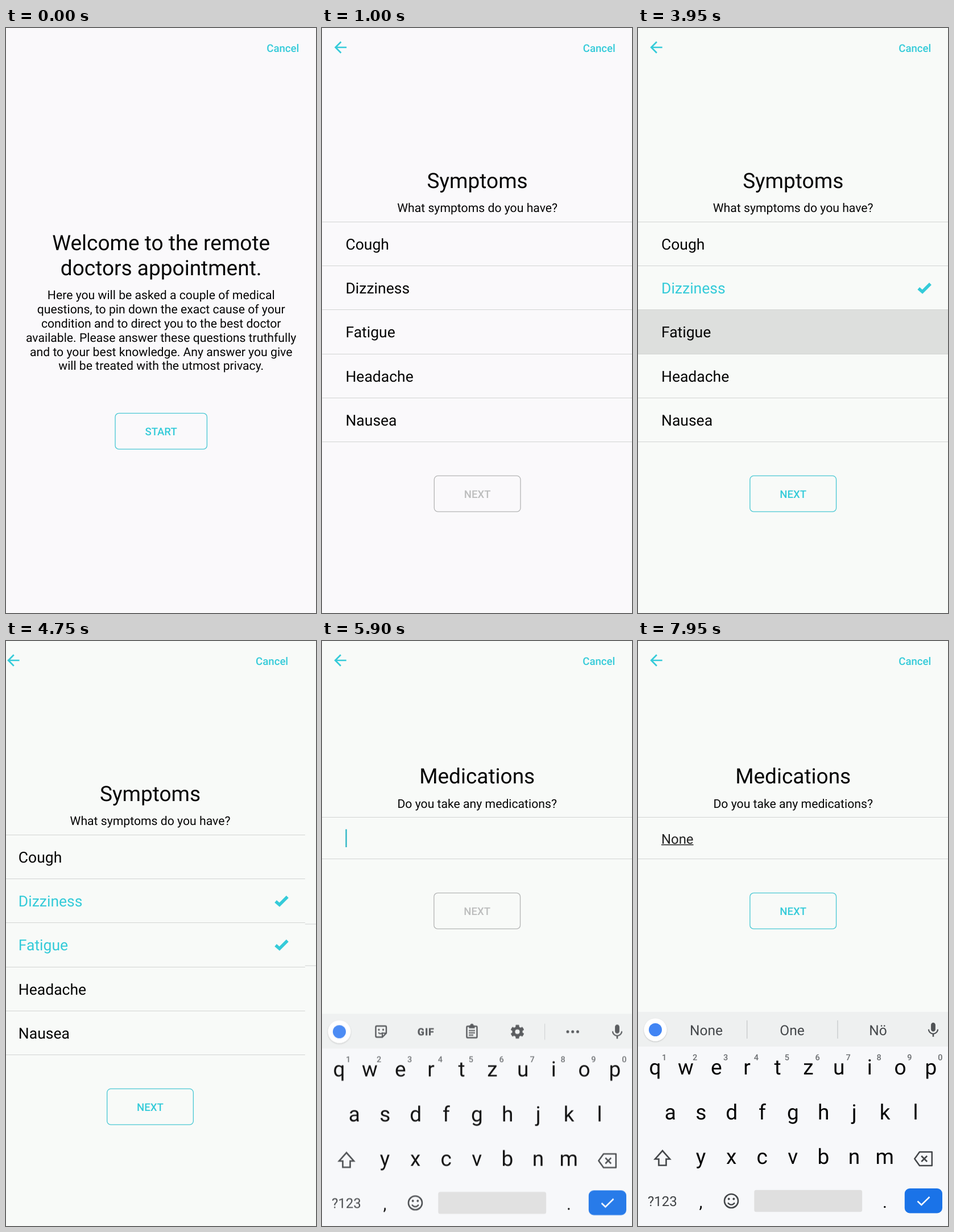
An HTML page for the animation above (8 s loop, 545 px wide and 1027 px high).

```html
<!DOCTYPE html>
<html lang="en">
<head>
<meta charset="utf-8">
<title>Remote appointment</title>
<style>
  html, body { margin: 0; width: 100%; height: 100%; overflow: hidden; background: #f9f9fa; }
  svg { display: block; width: 100%; height: 100%; }
  text { font-family: Roboto, "Noto Sans", sans-serif; fill: #050505; white-space: pre; text-rendering: geometricPrecision; }
  .mid { text-anchor: middle; }
  .title { font-size: 37px; }
  .body { font-size: 21.2px; }
  .item { font-size: 26.5px; }
  .action { font-size: 18.6px; font-weight: 500; }
  .entry { font-size: 23.9px; fill: #222; }
  .key { font-size: 37px; }
  .digit { font-size: 14.5px; font-weight: 500; fill: #6a6d70; }
  .sym { font-size: 24px; fill: #3f4245; }
  .word { font-size: 24.5px; fill: #45484b; }
  .line { fill: #d2d4d3; }
</style>
</head>
<body>
<svg id="stage" viewBox="0 0 545 1027" xmlns="http://www.w3.org/2000/svg"></svg>
<script>
const LOOP = 8000, STEP = 50, W = 545, MID = 272.7;
const TEAL = '#35cbd9', EDGE = '#4bc8d4', GREY = '#b5b6b6', ICON = '#505356', INK = '#434649';
const stage = document.getElementById('stage');

function add(parent, tag, attrs = {}, content) {
  const node = document.createElementNS('http://www.w3.org/2000/svg', tag);
  set(node, attrs);
  if (content !== undefined) node.textContent = content;
  parent.appendChild(node);
  return node;
}
function set(node, attrs) {
  for (const k in attrs) node.setAttribute(k, attrs[k]);
}
const show = (node, on) => set(node, { visibility: on ? 'visible' : 'hidden' });
const group = (parent, attrs) => add(parent, 'g', attrs);
const label = (parent, x, y, cls, content) => add(parent, 'text', { x, y, class: cls }, content);
const rect = (parent, x, y, width, height, attrs) => add(parent, 'rect', { x, y, width, height, ...attrs });
const stroke = (parent, d, color, width, attrs) =>
  add(parent, 'path', { d, fill: 'none', stroke: color, 'stroke-width': width, ...attrs });
const dot = (parent, cx, cy, r, fill) => add(parent, 'circle', { cx, cy, r, fill });

function header(page, back) {
  set(label(page, 486.8, 41.5, 'action mid', 'Cancel'), { style: `fill:${TEAL}` });
  if (back) add(page, 'path', {
    d: 'M20 11H7.83l5.59-5.59L12 4l-8 8 8 8 1.41-1.41L7.83 13H20z',
    transform: 'translate(16 18) scale(1.335)', fill: TEAL
  });
}

function button(parent, y, width, name) {
  const box = rect(parent, MID - width / 2, y, width, 63, { rx: 6.5, fill: 'none', 'stroke-width': 1.33 });
  const text = label(parent, MID, y + 38.5, 'action mid', name);
  return on => {
    set(box, { stroke: on ? EDGE : GREY });
    text.style.fill = on ? TEAL : '#bcbdbd';
  };
}

const defs = add(stage, 'defs');
function shadow(id, dy, blur, opacity) {
  const f = add(defs, 'filter', { id, x: '-40%', y: '-40%', width: '180%', height: '180%' });
  add(f, 'feDropShadow', { dx: 0, dy, stdDeviation: blur, 'flood-color': '#000', 'flood-opacity': opacity });
}
shadow('soft', 1, 1.3, 0.22);
shadow('lift', 2, 2.5, 0.3);

const backdrop = rect(stage, 0, 0, W, 1027);

// Welcome page
const welcome = group(stage);
header(welcome, false);
['Welcome to the remote', 'doctors appointment.'].forEach((s, i) =>
  label(welcome, MID, 390 + 43.5 * i, 'title mid', s));
['Here you will be asked a couple of medical',
 'questions, to pin down the exact cause of your',
 'condition and to direct you to the best doctor',
 'available. Please answer these questions truthfully',
 'and to your best knowledge. Any answer you give',
 'will be treated with the utmost privacy.'].forEach((s, i) =>
  label(welcome, MID, 476.3 + 24.8 * i, 'body mid', s));
button(welcome, 676.4, 161.4, 'START')(true);

// Symptoms page
const symptoms = group(stage);
header(symptoms, true);
label(symptoms, MID, 280.5, 'title mid', 'Symptoms');
label(symptoms, MID, 323.4, 'body mid', 'What symptoms do you have?');
const lineY = i => Math.round(340 + 77.2 * i);
const pressAt = { Dizziness: 2750, Fatigue: 3950 };
const rows = ['Cough', 'Dizziness', 'Fatigue', 'Headache', 'Nausea'].map((name, i) => {
  const y = lineY(i);
  const glow = rect(symptoms, 0, y, W, lineY(i + 1) - y, { fill: '#000' });
  const text = label(symptoms, 41, y + 49.2, 'item', name);
  const tick = stroke(symptoms, `M493.2 ${y + 40.1}L500 ${y + 46}L514 ${y + 32}`, TEAL, 5.5);
  return { glow, text, tick, press: pressAt[name] ?? Infinity };
});
for (let i = 0; i < 6; i++) rect(symptoms, 0, lineY(i), W, 1, { class: 'line' });
const nextSymptom = button(symptoms, 786.2, 151.7, 'NEXT');

// Medications page
const meds = group(stage);
header(meds, true);
const form = group(meds);
label(form, MID, 250, 'title mid', 'Medications');
label(form, MID, 292.8, 'body mid', 'Do you take any medications?');
rect(form, 0, 309, W, 1, { class: 'line' });
rect(form, 0, 382, W, 1, { class: 'line' });
const entry = label(form, 41, 355.7, 'entry', '');
const underline = rect(form, 41, 357, 0, 1.5, { fill: '#222' });
const caret = rect(form, 41, 330.5, 2.4, 31.5, { fill: '#2fb7c6' });
const nextMed = button(form, 442.4, 151.7, 'NEXT');

// Keyboard
const keyboard = group(stage);
rect(keyboard, 0, 651, W, 440, { fill: '#f7f8fa' });
rect(keyboard, 0, 651, W, 61, { fill: '#eef0f0' });
set(dot(keyboard, 30.5, 682.5, 20, '#fff'), { filter: 'url(#soft)' });
dot(keyboard, 30.5, 682.5, 11.5, '#4285f4');
add(keyboard, 'path', {
  d: 'M12 14c1.66 0 3-1.34 3-3V5c0-1.66-1.34-3-3-3S9 3.34 9 5v6c0 1.66 1.34 3 3 3z' +
     'M17.3 11c0 3-2.54 5.1-5.3 5.1S6.7 14.1 6.7 11H5c0 3.41 2.72 6.23 6 6.72V21h2v-3.28c3.28-.48 6-3.3 6-6.72z',
  transform: 'translate(503.4 667.5) scale(1.3)', fill: ICON
});

const tools = group(keyboard);
stroke(tools, 'M96.5 672.5H111a2 2 0 0 1 2 2V685L106 692H96.5a2 2 0 0 1-2-2V674.5a2 2 0 0 1 2-2z', ICON, 2.4);
stroke(tools, 'M106 692V687a2 2 0 0 1 2-2H113', ICON, 2);
stroke(tools, 'M99 684q4 4 8 0', ICON, 2);
dot(tools, 100, 679, 1.7, ICON);
dot(tools, 107.5, 679, 1.7, ICON);
set(label(tools, 182.8, 688.6, 'mid', 'GIF'),
  { style: `fill:${ICON};font-size:18px;font-weight:900;letter-spacing:.8px` });
rect(tools, 254.5, 673, 18, 20, { rx: 1.5, fill: 'none', stroke: ICON, 'stroke-width': 2.4 });
rect(tools, 258.5, 671.5, 10, 5, { fill: ICON });
dot(tools, 263.5, 671.5, 3, ICON);
stroke(tools, 'M258 680.5H269M258 684.5H269M258 688.5H266', ICON, 2);
add(tools, 'circle', { cx: 343.5, cy: 682.5, r: 6.6, fill: 'none', stroke: ICON, 'stroke-width': 5 });
for (let a = 0; a < 360; a += 60)
  rect(tools, 340.4, 670.6, 6.2, 5, { rx: 1, fill: ICON, transform: `rotate(${a} 343.5 682.5)` });
rect(tools, 391, 668.5, 1.2, 28, { fill: '#d0d3d4' });
for (const x of [432, 440.7, 449.5]) dot(tools, x, 682.5, 2.5, ICON);

const hints = group(keyboard);
for (const x of [191, 350.3]) rect(hints, x, 666, 1.3, 32, { fill: '#c6c9ca' });
const words = [120, 271, 422].map(x => label(hints, x, 692, 'word mid', ''));

const keys = {};
const ROWS = [['qwertzuiop', 29.9], ['asdfghjkl', 56.8], ['yxcvbnm', 110.4]];
ROWS.forEach(([letters, x0], r) => [...letters].forEach((ch, i) => {
  const x = x0 + 53.9 * i, y = 761.3 + 78.2 * r;
  keys[ch] = { x, row: r, text: label(keyboard, x, y, 'key mid', ch) };
  if (r === 0) label(keyboard, x + 16.3, 735.5, 'digit mid', (i + 1) % 10);
}));
const shift = stroke(keyboard, 'M43 894.8L30 909.5H36.5V920.5H49.5V909.5H56Z', INK, 2.6);
stroke(keyboard, 'M495 897H516.8V921H495L486.3 909Z', INK, 2.5, { 'stroke-linejoin': 'round' });
stroke(keyboard, 'M498.2 904L508.2 914M508.2 904L498.2 914', INK, 2.5);
label(keyboard, 42.8, 992, 'sym mid', '?123');
label(keyboard, 110.5, 994.5, 'key mid', ',').style.fontSize = '30px';
label(keyboard, 434, 995.3, 'key mid', '.').style.fontSize = '30px';
add(keyboard, 'circle', { cx: 164, cy: 983, r: 12, fill: 'none', stroke: INK, 'stroke-width': 2.6 });
dot(keyboard, 159.7, 979.5, 1.9, INK);
dot(keyboard, 168.3, 979.5, 1.9, INK);
stroke(keyboard, 'M158 986.2q6 7 12 0', INK, 2.3);
rect(keyboard, 204.3, 963.7, 189.8, 38.6, { rx: 3.5, fill: '#dfdfdf' });
rect(keyboard, 468.8, 961, 66.2, 43.5, { rx: 9, fill: '#1a73e8' });
stroke(keyboard, 'M491.5 983.5L498.3 990L512.5 976', '#fff', 2.5);

// Popup drawn around the origin of its key
const popup = group(keyboard);
rect(popup, -27, 626, 54.5, 156, { rx: 4, fill: '#eef1f1', filter: 'url(#lift)' });
const popupText = label(popup, 0, 677, 'key mid', '');
for (const x of [11.5, 16, 20.5]) rect(popup, x - 1.1, 690.4, 2.2, 2.2, { fill: '#222' });

const TYPED = [
  { at: 6600, text: 'N', hints: ['N', 'J', 'Nach'] },
  { at: 7050, text: 'No', hints: ['No', 'Not', 'Noch'] },
  { at: 7200, text: 'Non', hints: ['Non', 'None', 'Not'] },
  { at: 7450, text: 'None', hints: ['None', 'One', 'Nö'] }
];
const PRESSES = [['N', 6500, 6600], ['o', 7000, 7100], ['n', 7150, 7250], ['e', 7350, 7500]];
const FOCUS = 5650, LIFT = 5800;

// Critically damped spring, stiffness 1000 and mass 3
function spring(ms) {
  if (ms <= 0) return 0;
  const k = Math.sqrt(1000 / 3) * ms / 1000;
  return k > 9.5 ? 1 : 1 - Math.exp(-k) * (1 + k);
}

function drawPages(t) {
  const pos = spring(t - 484) + spring(t - 4734);
  [welcome, symptoms, meds].forEach((page, i) => {
    set(page, { transform: `translate(${((i - pos) * W).toFixed(2)} 0)` });
    show(page, Math.abs(i - pos) < 1);
  });
  const mix = Math.min(1, Math.max(0, (t - 1950) / 300));
  const tone = (a, b) => Math.round(a + (b - a) * mix);
  set(backdrop, { fill: `rgb(${tone(250, 248)},${tone(249, 250)},${tone(251, 248)})` });
}

function drawSymptoms(t) {
  for (const { glow, text, tick, press } of rows) {
    const picked = t >= press + 50;
    const alpha = t < press || t >= press + 100 ? 0 : picked ? 0.06 : 0.11;
    set(glow, { opacity: alpha });
    text.style.fill = picked ? TEAL : '';
    set(tick, { opacity: picked ? 1 : 0 });
  }
  nextSymptom(t >= 2800);
}

function drawForm(t, typed) {
  set(form, { transform: `translate(0 ${t >= LIFT ? 0 : 187.5})` });
  entry.textContent = typed ? typed.text : '';
  const width = typed ? entry.getComputedTextLength() : 0;
  set(underline, { width });
  const since = t - (typed ? typed.at : FOCUS);
  set(caret, { x: 41.3 + width, opacity: since >= 0 && since % 1000 < 500 ? 1 : 0 });
  nextMed(!!typed);
}

function drawKeyboard(t, typed) {
  show(keyboard, t >= LIFT);
  const rest = t >= 6050 ? 0 : Math.exp(-(t - 5790) / 46);
  set(keyboard, { transform: `translate(0 ${37.5 * rest})`, opacity: 1 - 0.65 * rest });
  set(tools, { opacity: typed ? 0 : 1 });
  set(hints, { opacity: typed ? 1 : 0 });
  words.forEach((w, i) => w.textContent = typed ? typed.hints[i] : '');
  const upper = t >= 5950 && t < 6600;
  for (const ch in keys) keys[ch].text.textContent = upper ? ch.toUpperCase() : ch;
  set(shift, { fill: upper ? INK : 'none' });
  const press = PRESSES.find(([, from, to]) => t >= from && t < to);
  set(popup, { opacity: press ? 1 : 0 });
  if (press) {
    const key = keys[press[0].toLowerCase()];
    popupText.textContent = press[0];
    set(popup, { transform: `translate(${key.x} ${78.2 * key.row})` });
  }
}

function render(ms) {
  const t = Math.floor((ms % LOOP) / STEP) * STEP;
  const typed = TYPED.filter(s => t >= s.at).pop();
  drawPages(t);
  drawSymptoms(t);
  drawForm(t, typed);
  drawKeyboard(t, typed);
}

const start = performance.now();
function tick(now) {
  render(Math.max(0, now - start));
  requestAnimationFrame(tick);
}
render(0);
requestAnimationFrame(tick);
</script>
</body>
</html>
```
